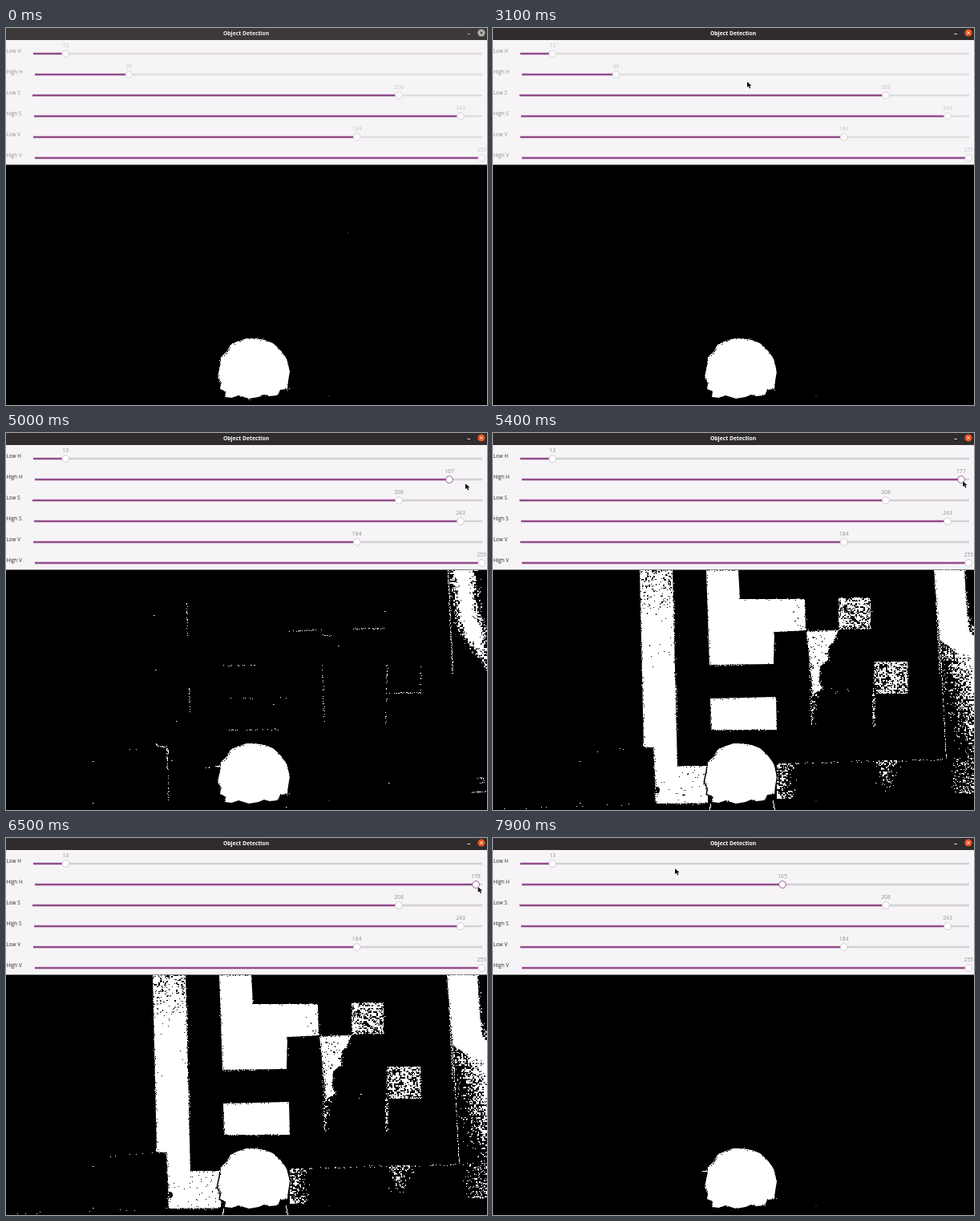
Recreate the animation shown at these times as an HTML page with a canvas. Size 600 by 470 pixels, loop 8 s.

```html
<!DOCTYPE html>
<html lang="en">
<head>
<meta charset="utf-8">
<title>Object Detection</title>
<style>
html, body { margin: 0; width: 100%; height: 100%; overflow: hidden; background: #000; }
canvas { display: block; }
</style>
</head>
<body>
<canvas width="600" height="470"></canvas>
<script>
const c = document.querySelector('canvas').getContext('2d');
const FONT = '"Open Sans", "Noto Sans", sans-serif';
const LOOP = 8000, STEP = 100;
let step = -1;

// Key lists: [time, value, ...]
const pointer = [[700, 545, 4], [900, 480, 35], [1000, 480, 35], [1300, 60, 21], [1500, 139, 49],
  [1700, 151, 55], [1800, 151, 55], [2700, 300, 69], [3100, 317, 67], [3600, 154, 58],
  [3900, 478, 60], [4000, 478, 60], [4600, 588, 62], [4800, 573, 63], [5000, 573, 63],
  [5300, 586, 60], [5900, 586, 60], [6300, 590, 61], [6900, 586, 60], [7200, 584, 60],
  [7400, 412, 53], [7600, 236, 38], [7700, 236, 38], [7900, 227, 38]];
const highHue = [[3600, 38], [3900, 140], [4000, 140], [4800, 165], [4900, 167], [5000, 167],
  [5300, 177], [5900, 177], [6300, 178], [6900, 177], [7200, 177], [7400, 168], [7600, 105]];
const maskHue = [[3600, 38], [3900, 130], [4900, 167], [5000, 167], [5300, 177],
  [7300, 177], [7400, 175], [7500, 167], [7600, 105]];

const clamp = v => Math.max(0, Math.min(1, v));

function at(keys, t) {
  const i = keys.findIndex(k => k[0] > t);
  if (i === 0) return keys[0].slice(1);
  if (i < 0) return keys[keys.length - 1].slice(1);
  const a = keys[i - 1], b = keys[i], u = (t - a[0]) / (b[0] - a[0]);
  return a.slice(1).map((v, j) => v + (b[j + 1] - v) * u);
}

function hash(x, y, z = 0) {
  const v = Math.sin(x * 12.9898 + y * 78.233 + z * 37.719) * 43758.5453;
  return v - Math.floor(v);
}

function path(pts) {
  c.beginPath();
  for (let i = 0; i < pts.length; i += 2) c.lineTo(pts[i], pts[i + 1]);
}

// Clumped, slightly flickering pixels; chance(x, y) is the local density.
function grain(x0, y0, x1, y1, chance, color) {
  c.fillStyle = color;
  for (let y = y0; y < y1; y++) {
    for (let x = x0; x < x1; x++) {
      const n = hash(x >> 1, y >> 1) * .6 + hash(x, y, 1) * .25 + hash(x, y, step + 2) * .15;
      if (n < chance(x, y)) c.fillRect(x, y, 1, 1);
    }
  }
}

// Broken pixel line along a list of points.
function dots(pts, p, spread = 0, color = '#fff') {
  c.fillStyle = color;
  for (let i = 0; i + 3 < pts.length; i += 2) {
    const [ax, ay, bx, by] = pts.slice(i, i + 4);
    const n = Math.ceil(Math.hypot(bx - ax, by - ay));
    for (let k = 0; k < n; k++) {
      const x = ax + (bx - ax) * k / n, y = ay + (by - ay) * k / n;
      if (hash(x, y) * .85 + hash(x, y, step) * .15 > p) continue;
      const dx = (hash(x, y, 3) - .5) * 2 * spread, dy = (hash(x, y, 4) - .5) * 2 * spread;
      c.fillRect(Math.round(x + dx), Math.round(y + dy), 1, 1);
    }
  }
}

function blob(pts, rough = .4) {
  path(pts);
  c.fillStyle = '#fff';
  c.fill();
  const ring = pts.concat(pts.slice(0, 2));
  dots(ring, rough, 1, '#000');
  dots(ring, rough * .4, 1.5);
}

const ball = [273, 460, 274, 453, 267, 450, 268, 443, 264, 435, 267, 421, 268, 410, 275, 404, 280, 395,
  288, 391, 300, 387, 312, 387, 323, 389, 333, 393, 342, 401, 350, 412, 354, 428, 352, 440, 351, 450,
  342, 451, 339, 458, 328, 459, 322, 457, 315, 460, 303, 462, 290, 458, 282, 461];

function redAreas(hue) {
  const d = clamp((hue - 167) / 8), thin = (177 - hue) * .04;
  blob([183, 171, 224, 171, 230, 415, 268, 415, 268, 461, 203, 462, 201, 392, 188, 391]);
  grain(184, 171, 223, 220, (x, y) => .34 - (y - 171) / 300 + thin / 2, '#000');
  grain(184, 220, 229, 300, () => .1, '#000');
  grain(204, 416, 268, 460, () => .12, '#000');
  c.beginPath();
  c.arc(204, 445, 4, 0, 7);
  c.fill();
  blob([266, 171, 306, 171, 308, 207, 389, 207, 390, 246, 351, 248, 350, 288, 270, 289], .3);
  grain(374, 215, 389, 246, () => .15 + thin, '#000');
  blob([271, 331, 353, 329, 354, 370, 272, 370], .3);
  blob([391, 247, 431, 246, 425, 260, 419, 266, 418, 283, 408, 291, 407, 312, 411, 318, 399, 326], .6);
  grain(396, 250, 420, 322, () => .2 + thin, '#000');
  grain(397, 316, 410, 366, (x, y) => .46 - (x - 397) / 30 - (y - 316) / 300, '#fff');
  grain(410, 318, 448, 326, () => .17, '#fff');
  grain(473, 325, 477, 366, () => .4 - thin, '#fff');
  grain(431, 205, 471, 244, () => .55 - thin / 2, '#fff');
  grain(476, 285, 517, 325, () => .54 - thin / 2, '#fff');
  blob([550, 171, 588, 171, 593, 246, 600, 254, 600, 280, 578, 272, 557, 258]);
  grain(557, 252, 600, 425, (x, y) =>
    .72 - thin - (y - 250) / 260 + (x - 582) / 70 - Math.max(0, y - 385) / 200, '#fff');
  grain(354, 412, 380, 456, (x, y) => .56 - thin - (x - 354) / 60, '#fff');
  grain(478, 408, 510, 450, (x, y) =>
    .47 - thin * 1.5 - (y - 408) / 130 - Math.abs(x - 491) / 90, '#fff');
  grain(570, 405, 600, 450, (x, y) => .26 - thin + (x - 585) / 150, '#fff');
  dots([557, 258, 565, 406], .55);
  dots([376, 411, 565, 407], .3, 1);
  dots([0, 468, 203, 462], .12, 1);
  dots([203, 461, 268, 461], .6, 1);
  dots([271, 462, 270, 470], 1);
  dots([349, 458, 351, 470], 1);
  if (d < 1) grain(180, 171, 600, 470, () => 1 - d, '#000');
}

function specks(b) {
  const line = (p, ...pts) => dots(pts, p * b, .7);
  line(.35, 225, 212, 226, 252);
  line(.45, 228, 318, 229, 352);
  line(.4, 270, 289, 312, 289);
  line(.4, 350, 247, 395, 245);
  line(.6, 395, 251, 405, 253);
  line(.6, 431, 244, 472, 243);
  line(.3, 394, 288, 397, 368);
  line(.4, 475, 288, 473, 365);
  line(.5, 476, 324, 518, 323);
  line(.25, 517, 288, 517, 325);
  line(.3, 272, 370, 340, 369);
  line(.15, 271, 331, 353, 329);
  line(.15, 120, 398, 188, 391);
  line(.9, 187, 387, 189, 390, 200, 391, 202, 400);
  line(.8, 201, 394, 201, 420);
  line(.4, 202, 428, 202, 460);
  line(.4, 248, 417, 267, 415);
  line(.8, 580, 447, 600, 447);
  line(.6, 588, 432, 590, 429, 595, 430, 596, 434, 591, 436);
  line(.9, 551, 171, 557, 300);
  if (b > .5) {
    c.fillStyle = '#fff';
    [[108, 409], [108, 461], [184, 227], [186, 295], [472, 222], [414, 265], [400, 252], [333, 338],
      [206, 408], [212, 359], [477, 436], [349, 466]].forEach(([x, y]) => c.fillRect(x, y, 1.5, 1));
  }
  grain(550, 171, 600, 300, (x, y) => {
    const mid = 569 + (y - 171) * .12 + Math.max(0, y - 230) * .25;
    return 1.2 - Math.abs(x - mid) / 19 - Math.max(0, y - 250) / 50 - (1 - b) * 1.5;
  }, '#fff');
}

function mask(t) {
  const [hue] = at(maskHue, t);
  c.fillStyle = '#000';
  c.fillRect(0, 170, 600, 300);
  if (hue > 167.5) redAreas(hue);
  const b = clamp((hue - 115) / 52);
  if (b) specks(b);
  path(ball);
  c.closePath();
  c.strokeStyle = '#000';
  c.lineWidth = 3;
  c.stroke();
  blob(ball, .35);
  if (hue > 100) dots([261, 415, 267, 415], .9);
  c.fillStyle = '#777';
  if (hash(step, 5) < .7) c.fillRect(426.5, 255, 1, 1);
  c.fillRect(402.5, 458, 1, 1);
}

function text(str, x, y, size, color, align = 'left', weight = 400) {
  c.font = `${weight} ${size}px ${FONT}`;
  c.textAlign = align;
  c.fillStyle = color;
  c.fillText(str, x, y);
}

function stroke(color, width, ...pts) {
  path(pts);
  c.strokeStyle = color;
  c.lineWidth = width;
  c.stroke();
}

function titleBar(active) {
  c.fillStyle = active ? '#302c2d' : '#3d3939';
  c.fillRect(0, 0, 600, 15);
  text('Object Detection', 299.5, 9, 6.8, active ? '#fff' : '#f4f2f2', 'center', 700);
  stroke(active ? '#ddd' : '#aaa', 1, 575.5, 7.5, 579, 7.5);
  c.fillStyle = active ? '#e95420' : '#b5b1af';
  c.beginPath();
  c.arc(593, 6, 4.6, 0, 7);
  c.fill();
  const ink = active ? '#fff' : '#3d3939';
  stroke(ink, 1, 591.3, 4.3, 594.7, 7.7);
  stroke(ink, 1, 594.7, 4.3, 591.3, 7.7);
}

function slider(row, name, left, value, x, active, held) {
  const y = 32 + row * 26;
  text(name, .5, y - 1.2, 6.4, active ? '#302e30' : '#929092');
  text(value, x, y - 8, 6.8, active ? '#929092' : '#c8c5c8', 'center');
  stroke(active ? '#d3d0d3' : '#e0dde0', 2.3, x, y, 594, y);
  stroke('#924d8b', 2.3, left, y, x, y);
  c.beginPath();
  c.arc(x, y, 4.4, 0, 7);
  c.fillStyle = active ? '#fff' : '#faf9fa';
  c.fill();
  c.strokeStyle = held ? '#924d8b' : active ? '#cbc6cb' : '#d5d1d5';
  c.lineWidth = .9;
  c.stroke();
}

function panel(t) {
  const active = t >= 3200, [hue] = at(highHue, t);
  c.fillStyle = '#f6f4f7';
  c.fillRect(0, 15, 600, 155.5);
  titleBar(t >= 3000);
  [['Low H', 34, 13, 74.3], ['High H', 36, Math.round(hue), 35.8 + 3.097 * hue],
    ['Low S', 33, 208, 490], ['High S', 35, 243, 567],
    ['Low V', 34, 184, 437.7], ['High V', 36, 255, 593.3]]
    .forEach((s, i) => slider(i, ...s, active, i === 1 && t >= 3600));
}

function arrow(t) {
  if (t < pointer[0][0]) return;
  const [x, y] = at(pointer, t);
  c.save();
  c.translate(x, y);
  path([0, 0, 0, 7, 1.8, 5.5, 3.2, 8.4, 4.5, 7.8, 3.2, 5, 5.6, 5]);
  c.closePath();
  c.strokeStyle = '#fff';
  c.lineWidth = 1.2;
  c.stroke();
  c.fillStyle = '#111';
  c.fill();
  c.restore();
}

function tick() {
  const now = Math.floor(performance.now() % LOOP / STEP);
  if (now !== step) {
    step = now;
    const t = step * STEP;
    mask(t);
    panel(t);
    arrow(t);
  }
  requestAnimationFrame(tick);
}
tick();
</script>
</body>
</html>
```
